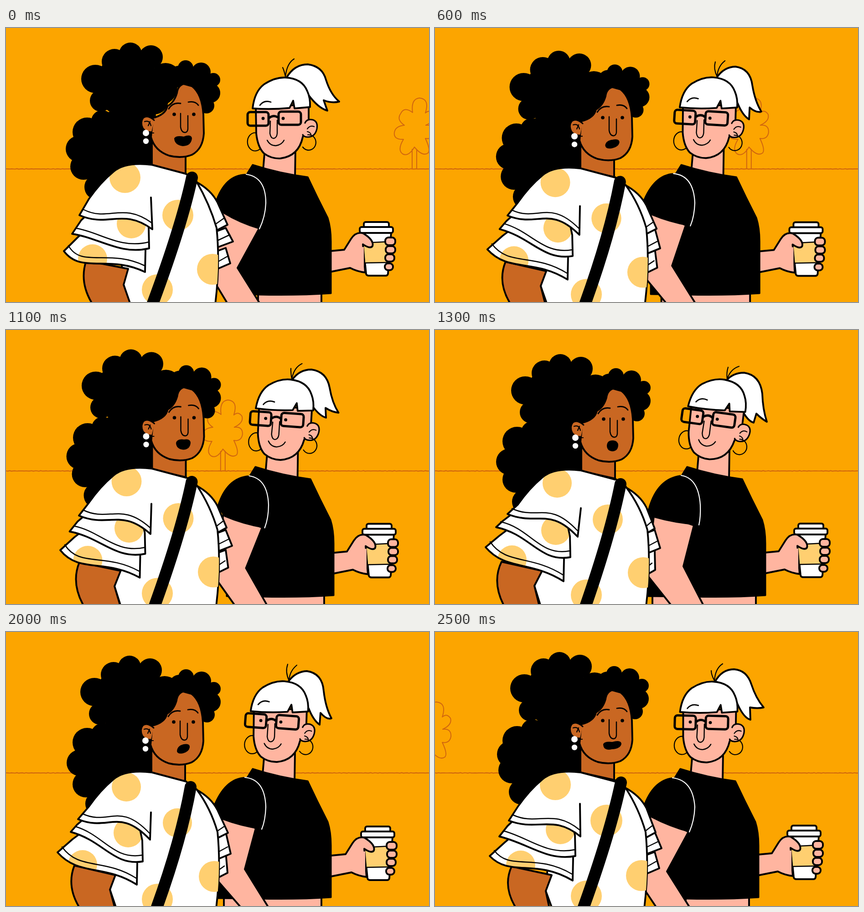
Recreate the animation shown at these times as an HTML page with a canvas. Size 928 by 603 pixels, loop 2.6 s.

```html
<!DOCTYPE html>
<html lang="en">
<head>
<meta charset="utf-8">
<title>A walk with coffee</title>
<style>
html, body { margin: 0; width: 100%; height: 100%; overflow: hidden; background: #fca500; }
canvas { display: block; }
</style>
</head>
<body>
<canvas id="stage" width="928" height="603"></canvas>
<script>
const ctx = document.getElementById('stage').getContext('2d');
const BG = '#fca500', INK = '#000', WHITE = '#fff', BROWN = '#c96722',
      PINK = '#ffb5a0', DOT = '#ffcf70', RUST = '#d0660f';

// Walk cycle: [step, pose]; poses are 0 up, 1 down, 2 rising, 3 down on the other foot
const WALK = [[0, 0], [3, 1], [5, 1], [8, 2], [9, 0], [13, 3], [16, 0]];
const TREE = [[0, 896], [3, 804], [8, 612], [13, 385], [16, 320], [19, 252], [24, -8]];
let weights = [1, 0, 0, 0];

function segment(keys, k) {
  let i = 0;
  while (i < keys.length - 2 && k >= keys[i + 1][0]) i++;
  const [t0, a] = keys[i], [t1, b] = keys[i + 1];
  return { a, b, u: (k - t0) / (t1 - t0) };
}

function setPose(k) {
  const { a, b, u } = segment(WALK, k % 16);
  const e = u * u * (3 - 2 * u);
  weights = [0, 0, 0, 0];
  weights[a] += 1 - e;
  weights[b] += e;
}

// Blend one value, or all numbers of a path, over the four poses
const v = (...p) => p.reduce((s, n, i) => s + n * weights[i], 0);
function mix(...paths) {
  const nums = paths.map(s => s.match(/\d+/g));
  let i = 0;
  return paths[0].replace(/\d+/g, () => {
    const n = v(...nums.map(a => a[i]));
    i++;
    return n.toFixed(1);
  });
}

function shape(d, fill, width = 3.9, color = INK) {
  const p = new Path2D(d);
  if (fill) { ctx.fillStyle = fill; ctx.fill(p); }
  if (width) { ctx.lineWidth = width; ctx.strokeStyle = color; ctx.stroke(p); }
  return p;
}
const line = (d, width = 2.5, color = INK) => shape(d, null, width, color);

function disc(x, y, r, fill = INK) {
  ctx.fillStyle = fill;
  ctx.beginPath();
  ctx.arc(x, y, r, 0, 7);
  ctx.fill();
}

function box(x, y, w, h, r, fill, width = 3.9) {
  ctx.beginPath();
  ctx.roundRect(x, y, w, h, r);
  if (fill) { ctx.fillStyle = fill; ctx.fill(); }
  ctx.lineWidth = width;
  ctx.strokeStyle = INK;
  ctx.stroke();
}

function group(dx, dy, draw, deg = 0, px = 0, py = 0) {
  ctx.save();
  ctx.translate(px + dx, py + dy);
  ctx.rotate(deg * Math.PI / 180);
  ctx.translate(-px, -py);
  draw();
  ctx.restore();
}

function clipped(path, draw) {
  ctx.save();
  ctx.clip(path);
  draw();
  ctx.restore();
}

function scenery(k) {
  ctx.fillStyle = BG;
  ctx.fillRect(0, 0, 928, 603);
  let d = 'M0 310';
  for (let x = 4; x <= 928; x += 4)
    d += `L${x} ${(310.2 + 0.6 * Math.sin(x * 0.83 + k) * Math.sin(x * 0.19)).toFixed(2)}`;
  line(d, 2.2, RUST);
  const { a, b, u } = segment(TREE, k);
  group(a + (b - a) * u, 0, () => {
    line('M-5 267V310M5 267V310', 2, RUST);
    line('M0 262Q-13 284 -26 277Q-38 268 -24 245Q-46 246 -44 230Q-42 216 -22 214Q-40 202 -30 188' +
      'Q-22 172 -4 186Q-8 156 11 154Q34 156 24 187Q34 178 42 190Q46 204 25 214Q44 212 43 230' +
      'Q40 246 24 243Q36 268 30 275Q18 284 0 262Z', 2, RUST);
  });
}

function coffee() {
  shape('M781 450L790 541Q791 545 796 545L833 545Q837 545 838 541L845 450Z', WHITE);
  shape('M784 473L843 470L839 516L788 517Z', DOT, 0);
  line('M784 473L843 470M788 517L839 516');
  box(785, 427, 55, 14, 4, WHITE);
  box(776, 438, 73, 13, 4, WHITE);
  shape('M700 492L742 488L757 464Q768 447 784 452Q808 467 804 480Q799 487 783 476L788 538' +
    'Q770 536 755 528L700 539', PINK);
  ctx.fillStyle = PINK;
  ctx.fillRect(776, 482, 9, 50);
  [[832, 461, 22, 17], [833, 480, 21, 16], [832, 498, 20, 16], [831, 518, 18, 15]]
    .forEach(([x, y, w, h]) => box(x, y, w, h, 7, PINK));
}

function torso() {
  const hip = v(553, 478, 553, 465).toFixed(1), x = v(505, 463, 505, 451).toFixed(1);
  shape(`M${hip} 580V608L692 608L692 580Z`, PINK);
  shape(`M541 301Q600 320 662 328L683 372L706 418Q713 440 713 470L713 584Q640 589 553 587L${x} 586` +
    `L${x} 400L528 322Z`, INK, 3);
}

function nearArm() {
  shape(mix('M474 395L556 440L508 528L558 608L487 608L455 555Z',
    'M474 400L548 432L524 522L577 608L517 608L464 547Z',
    'M474 395L556 440L509 527L560 608L487 608L455 560Z',
    'M481 400L568 430L545 520L590 608L520 608L466 540Z'), PINK);
  shape(mix('M527 322Q480 322 459 385L478 408Q514 430 556 442Q569 415 570 385Q570 328 527 322Z',
    'M524 320Q480 322 455 385L475 412Q514 427 561 434Q569 415 570 385Q568 324 524 320Z',
    'M521 321Q478 326 457 385L476 408Q514 428 558 440Q569 415 570 385Q566 326 521 321Z',
    'M540 320Q488 326 469 392L481 412Q526 425 579 429Q583 412 582 385Q578 326 540 320Z'), INK, 2);
  line(mix('M527 322Q570 328 570 385Q569 415 556 442', 'M524 320Q568 324 570 385Q569 415 561 434',
    'M521 321Q566 326 570 385Q569 415 558 440', 'M540 320Q578 326 582 385Q583 412 579 429'), 2.2, WHITE);
}

function ponytail() {
  shape(mix('M615 110Q632 80 662 80Q694 84 702 114Q712 146 731 162Q714 166 697 159L705 182Q685 176 664 148L640 130',
    'M620 108Q636 87 660 86Q694 91 697 130Q701 166 714 190Q704 194 690 178L688 204Q674 194 664 168L640 130',
    'M614 110Q629 82 656 82Q684 84 694 115Q704 146 721 166Q708 169 691 166L692 193Q677 189 663 157L640 130',
    'M640 110Q655 94 678 94Q713 99 718 140Q719 174 728 202Q716 195 705 184L699 204Q686 200 674 177L650 130'), WHITE);
  line(mix('M613 107Q610 93 607 87M613 107Q616 78 632 68', 'M621 107Q612 88 618 71M621 107Q622 86 638 73',
    'M613 107Q606 94 606 85M613 107Q615 80 631 70', 'M641 108Q639 94 643 82M641 108Q648 86 667 80'), 2.2);
}

function paleHead() {
  line('M560 238A17 20 0 1 0 560 263', 2.2);
  shape('M548 170L549 232Q552 262 566 276Q582 288 602 287Q642 282 651 240L664 205L664 170Z', PINK);
  shape('M656 209Q660 199 673 202Q685 206 682 222Q678 240 662 240Q654 240 651 235', PINK, 3.2);
  line('M661 222Q667 213 676 217M661 228Q667 229 669 234', 2.2);
  line('M662 235A16 17 0 1 1 651 262', 2.2);
  shape('M541 177Q545 140 566 124Q590 108 613 109Q650 111 661 139Q668 154 667 174L633 177L630 160L622 176Q582 180 541 177Z', WHITE);
  group(0, v(0, -8, -1, -5), () => line('M557 170Q566 158 581 163', 2.8));
  line('M580 205L579 232Q581 243 587 243Q594 242 595 232L595 203', 2.4);
  line('M573 247Q579 259 592 259Q605 257 610 247', 2.4);
  group(0, v(0, -1, 0, -2), () => {
    box(530, 185, 46, 30, 6, null, 5);
    box(598, 184, 49, 29, 6, null, 5);
    line('M577 198Q587 190 597 197', 5);
    disc(564, 199, 3.4);
    disc(608, 199, 3.4);
  }, v(0, 2.5, 0.5, 1), 588, 198);
}

function friend() {
  const dx = v(0, 0, -3, 12);
  ponytail();
  group(v(0, 3, -3, 12), v(0, 1, -1, -1), coffee);
  group(v(0, -1, -3, 11), 0, () => shape('M568 265L563 325L634 330L635 265', PINK));
  group(v(0, -5, -4, 11), v(0, -1, 0, -2), paleHead, v(0, 1.7, 1, 7), 600, 200);
  group(dx, 0, torso);
  nearArm();
}

const lobes = list => list.forEach(c => disc(...c));

function curls() {
  group(0, v(0, 13, 10, 14), () => shape('M210 190L330 150L325 320L240 330L187 366L182 340L170 240Z', INK, 0));
  lobes([
    [v(178, 178, 180, 180), v(229, 243, 239, 245), 32],
    [v(160, 162, 165, 163), v(266, 288, 269, 290), 29],
    [v(170, 175, 168, 177), v(305, 335, 304, 329), 29],
    [v(200, 202, 190, 197), v(350, 378, 352, 378), 28],
    [v(211, 211, 213, 213), v(205, 225, 216, 225), 24]]);
  group(v(0, -2, 0, 2), v(0, 20, 12, 21), () => lobes([[196, 112, 31], [238, 74, 28], [273, 57, 25],
    [318, 64, 26], [208, 160, 24], [266, 126, 70], [335, 130, 41], [350, 110, 33], [326, 160, 30]]));
  group(v(0, 1, -1, 3), v(0, 11, 4, 13), () => lobes([[394, 88, 17], [428, 97, 21], [455, 114, 15],
    [448, 143, 22], [440, 171, 17], [405, 115, 28], [380, 107, 24], [430, 135, 26]]));
}

function darkHead() {
  shape('M320 250L320 325L394 335L394 270', BROWN);
  shape('M390 123Q377 127 375 143Q369 164 354 172Q350 191 322 198L318 240Q326 270 358 281' +
    'Q385 288 408 279Q432 266 434 232L433 190Q430 145 408 128Z', BROWN);
  shape('M325 203Q310 190 301 198Q294 207 300 220Q306 229 319 229', BROWN, 3);
  line('M304 206Q315 202 318 215M312 215L316 206M317 231L324 231', 2.2);
  disc(307, 231, 7, WHITE);
  disc(307, 249, 6.2, WHITE);
  line('M357 178Q366 163 383 166M400 163Q415 160 422 170', 2.8);
  line('M383 188L383 218Q385 230 393 230Q400 229 399 218L399 193', 2.4);
  disc(369, 190, 3.8);
  disc(412, 190, 3.8);
}

function sideRuffles() {
  const tiers = [
    [v(492, 486, 492, 483), v(518, 530, 520, 528), 484],
    [v(498, 493, 497, 494), v(470, 488, 476, 480), 440],
  ];
  const tier = (start, x, y) => {
    shape(`${start}L${x} ${y}L455 ${y + 16}`, WHITE);
    line(`M${x - 7} ${y - 15}L455 ${y + 2}`);
  };
  tiers.forEach(([x, y, top]) => tier(`M455 ${top + 10}L482 ${top}`, x, y));
  const s = v(0, 8, 4, 7);
  tier(`M416 ${338 + s}Q450 ${356 + s} 464 ${384 + s}`, v(486, 487, 484, 482), v(433, 442, 441, 437));
}

function dressBody() {
  const s = v(0, 8, 5, 6), e = v(0, 2, 0, 4);
  const x = v(258, 228, 243, 218), y = v(565, 567, 570, 563);
  const body = shape(`M300 ${300 + s}L395 ${321 + s}L418 ${338 + s}Q${447 + e} 388 ${462 + e} 440` +
    `Q${470 + e} 520 ${459 + e} 608L${x + 14} 608L${x} ${y}L250 480L230 390Z`, WHITE);
  clipped(body, () => {
    disc(v(377, 376, 376, 379), v(412, 420, 415, 417), v(34, 32, 35, 33), DOT);
    disc(v(453, 457, 453, 457), v(531, 538, 536, 534), 34, DOT);
    disc(332, v(576, 588, 581, 583), 34, DOT);
  });
}

function strap() {
  line(mix('M408 329Q384 440 319 614', 'M405 341Q384 460 328 614',
    'M408 331Q384 445 323 614', 'M407 339Q385 450 328 614'), 26);
}

function upperArm() {
  shape(mix('M176 512Q160 560 190 608L273 608L258 565L268 530Z', 'M150 514Q132 560 162 608L239 608L228 567L240 535Z',
    'M168 516Q148 560 178 608L251 608L243 570L256 535Z', 'M146 510Q124 555 152 608L229 608L218 563L235 530Z'), BROWN);
}

// One frill: hem runs from the outer tip to the inner end
function frill(start, hem, close, dot) {
  const [x0, y0, x1, y1, x2, y2, x3, y3] = hem.match(/[\d.]+/g).map(Number);
  const d = `${start}L${x0} ${y0}C${x1} ${y1} ${x2} ${y2} ${x3} ${y3}L${close(x3, y3)}`;
  const p = shape(d, WHITE, 0);
  clipped(p, () => disc(...dot, DOT));
  line(d, 3.9);
  line(`M${x0 + 10} ${y0 - 12}C${x1} ${y1 - 13} ${x2} ${y2 - 13} ${x3 - 1} ${y3 - 14}`);
}

function sleeve() {
  frill(mix('M198 428L158 460', 'M188 425L146 456', 'M192 430L153 463', 'M182 422L141 453'),
    mix('127 491 165 542 225 498 305 537', '113 485 160 538 215 510 287 556',
      '120 493 165 540 220 498 302 547', '111 478 155 530 210 507 282 553'),
    (x, y) => `${x + 1} ${y - 48}L${x} ${y - 90}`,
    [v(190, 168, 188, 169), v(508, 512, 513, 506), 32]);
  frill(mix('M205 385L165 423', 'M195 390L156 424', 'M200 388L159 427', 'M195 385L149 420'),
    mix('145 453 205 462 250 500 314 485', '142 440 215 460 235 515 300 505',
      '141 450 205 465 245 505 308 493', '134 434 210 450 230 512 297 500'),
    (x, y) => `${x - 1} ${y - 46}L${x - 10} ${y - 90}`,
    [v(275, 268, 275, 265), v(431, 442, 435, 441), 32]);
  const s = v(0, 8, 8, 8);
  const inner = `${v(318, 318, 318, 320)} ${v(373, 397, 378, 392)}`;
  frill(`M395 ${321 + s}L320 ${301 + s}Q262 ${294 + s} 236 ${316 + s}Q206 ${341 + s} 182 ${376 + s}`,
    mix('161 412 225 440 255 395 321 443', '158 412 225 440 248 385 316 457',
      '162 415 225 440 258 400 319 450', '159 405 225 432 250 388 313 455'),
    () => inner,
    [v(261, 264, 264, 268), v(329, 341, 336, 337), v(34, 32, 34, 32)]);
}

function walker() {
  curls();
  group(v(0, -1, -1, 1), v(0, 8, 5, 6), darkHead);
  shape(mix('M370 243Q374 237 390 240Q406 234 407 243Q405 259 388 259Q371 257 370 243Z',
    'M376 262Q377 251 390 248Q403 246 402 254Q400 263 388 266Q377 268 376 262Z',
    'M370 247Q373 241 389 243Q407 238 408 246Q406 256 388 257Q370 261 370 247Z',
    'M378 254Q379 243 391 244Q401 245 401 254Q400 266 389 266Q378 265 378 254Z'), INK, 2);
  sideRuffles();
  dressBody();
  upperArm();
  sleeve();
  strap();
}

function render(now) {
  const slot = Math.floor(now % 2600 / 100);
  const k = slot < 14 ? slot : slot - 1; // one step is held twice as long
  setPose(k);
  ctx.lineJoin = ctx.lineCap = 'round';
  scenery(k);
  friend();
  walker();
}

const start = performance.now();
function tick() {
  render(performance.now() - start);
  requestAnimationFrame(tick);
}
tick();
</script>
</body>
</html>
```
